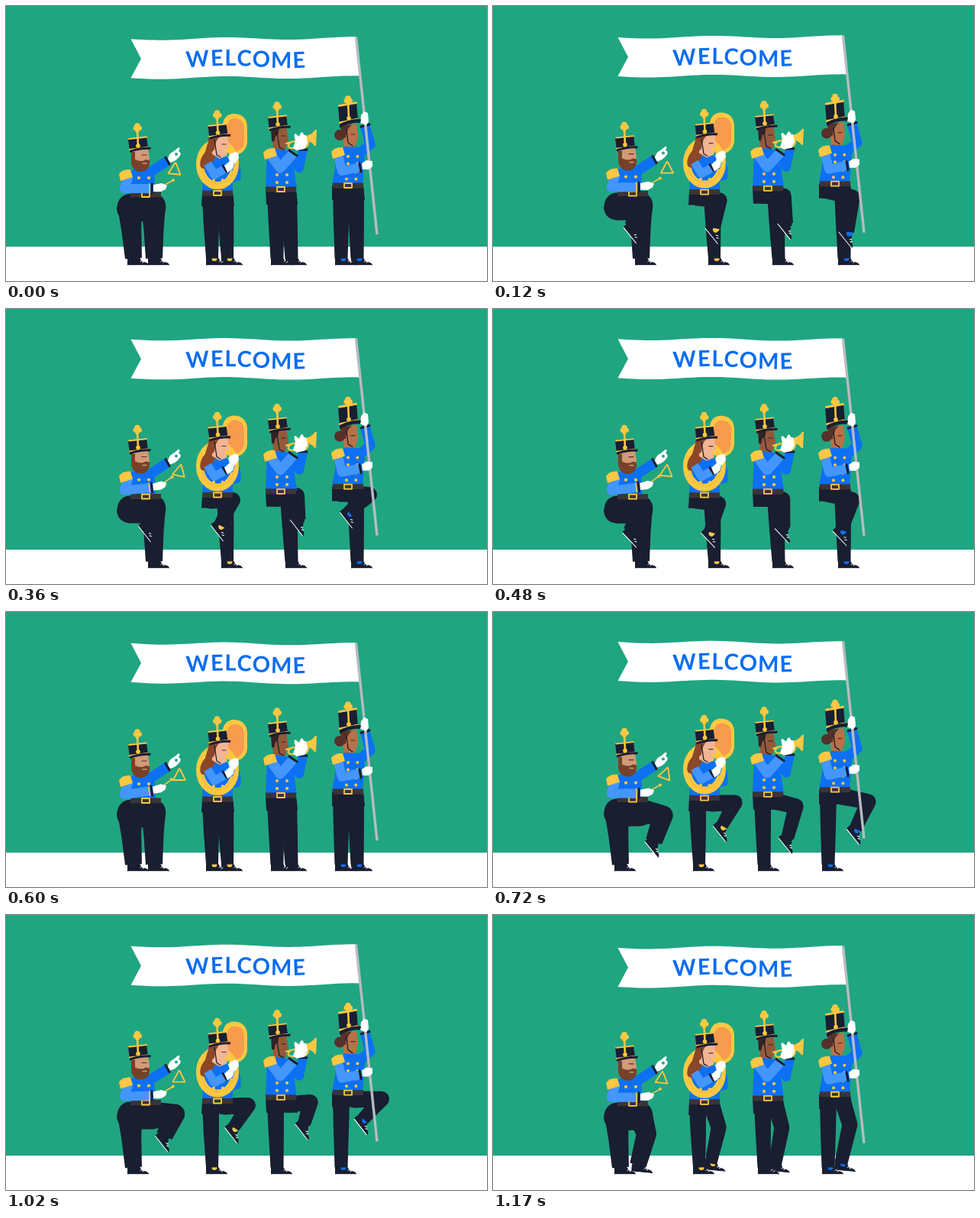
Animation of 630x360 px, one loop 1200 ms. Source, as an HTML page:

```html
<!DOCTYPE html>
<html lang="en">
<head>
<meta charset="utf-8">
<title>Marching band</title>
<style>
html, body { margin: 0; width: 100%; height: 100%; overflow: hidden; background: #fff; }
svg { display: block; }
text { font: 700 29px Lato, "Open Sans", sans-serif; letter-spacing: 1.4px; fill: #0b6df0; }
.n { fill: #191e31; } .b { fill: #0d70f3; } .y { fill: #fdc841; } .w { fill: #fff; }
.ln { fill: none; stroke-linecap: round; stroke-linejoin: round; }
.flat { stroke-linecap: butt; }
.sy { stroke: #fdc841; } .sn { stroke: #191e31; } .sb { stroke: #0d70f3; } .sl { stroke: #4496fb; }
</style>
</head>
<body>
<svg width="630" height="360" viewBox="0 0 630 360">
<defs>
  <g id="crown">
    <path class="n" d="M-13-14 11-17 13-2-11 2Z"/>
    <path class="ln sy" stroke-width="1.800" d="M-12-14 11-16.500M-11 0 12-3"/>
    <path class="n" d="M-11 1Q4-4 17-3L16 0Q5-1-11 4Z"/>
  </g>
  <g id="plume">
    <path class="ln sy" stroke-width="2.600" d="M-1-26 0-5"/>
    <g class="y"><circle cx="-1" cy="-31" r="3.800"/><circle cx="-3.500" cy="-28" r="3"/><circle cx="2" cy="-28" r="3"/><circle cx="-1" cy="-25" r="2.600"/><circle cy="-5" r="2.800"/></g>
  </g>
  <g id="hat"><use href="#crown"/><use href="#plume"/></g>
  <g id="shoe">
    <path class="n" d="M-8-1H8L11 4Q20 5 20 9H-8Z"/>
    <path class="ln" stroke="#fff" d="M-7 9.300H19M9 4 11 2.500M12 5.500 14 4"/>
  </g>
  <g id="belt">
    <path fill="#3b3437" d="M-20-3.500H20V3.500H-20Z"/>
    <rect class="ln sy" x="-5" y="-3" width="10" height="6" stroke-width="1.800"/>
  </g>
  <g id="buttons" class="y">
    <circle r="2.100"/><circle cx="13" r="2.100"/><circle cy="10" r="2.100"/><circle cx="13" cy="10" r="2.100"/>
  </g>
  <path id="pad" class="y" d="M-9-1Q-4-8 6-7L9 3-7 8Z"/>
  <path id="base"/>
</defs>
<rect width="630" height="315" fill="#20a581"/>
<path id="flag" class="w"/>
<text text-anchor="middle"><textPath href="#base" startOffset="50%">WELCOME</textPath></text>

<g id="legs0"></g>
<g id="body0">
  <path class="n" d="M163 247H201Q211 254 209 267 207 281 191 282H162Q146 280 145 265 146 252 163 247Z"/>
  <path class="ln flat sb" stroke-width="13" d="M185 220 211 203"/>
  <path class="ln sn" stroke-width="3" d="M209 198 214 207"/>
  <path class="w" d="M212 200Q214 192 220 190L226 185Q229 186 226 190 231 193 227 197 223 203 215 205Z"/>
  <circle cx="223" cy="194" r="2" fill="#20a581"/>
  <g id="tri"><path class="ln sy" stroke-width="1.800" d="M0 0-8 15H8L1 1"/></g>
  <path class="b" d="M157 218Q163 213 185 213L194 218 196 246H163Z"/>
  <path fill="#d39a78" d="M166 189 186 187 188 200 185 211H167Z"/>
  <path fill="#774029" d="M164 191H169V201Q178 205 183 201L188 202Q189 215 178 217 165 217 164 204Z"/>
  <path class="ln" stroke="#d39a78" stroke-width="1.500" d="M179 206H184"/>
  <path class="ln" stroke="#5a2e20" stroke-width="1.200" d="M178 195H184"/>
  <use href="#buttons" x="174" y="225"/>
  <use href="#belt" x="183" y="247"/>
  <use href="#hat" x="173" y="188"/>
  <path class="ln sl" stroke-width="12" d="M160 225 155 238"/>
  <g id="arm">
    <path class="ln flat sl" stroke-width="12" d="M155 239H190"/>
    <circle cx="155" cy="239" r="6" fill="#4496fb"/>
    <path class="ln sn" stroke-width="3" d="M191 233V245"/>
    <path class="ln sy" stroke-width="1.500" d="M188 233V245"/>
    <path class="ln sy" stroke-width="1.600" d="M203 237 219 228"/><circle class="y" cx="219" cy="228" r="2"/>
    <path class="w" d="M193 234 204 232 211 235 209 240 203 243H193Z"/>
  </g>
  <use href="#pad" x="157" y="221"/>
</g>

<g id="legs1"></g>
<g id="body1">
  <path class="n" d="M257 244H297L299 262H256Z"/>
  <path class="y" d="M283 163Q283 141 299 141 316 142 316 160V178Q315 191 302 195L283 190Z"/>
  <path fill="#f79b4d" d="M289 162Q289 147 300 147 312 148 312 161V178Q311 187 301 191L289 186Z"/>
  <path class="b" d="M259 203 267 197 292 199 304 204Q309 213 307 228L297 231V244H257Z"/>
  <ellipse class="ln sy" cx="277" cy="207" rx="23" ry="28" stroke-width="10"/>
  <path class="ln" stroke="#f2b23a" stroke-width="1" d="M257 195Q252 232 277 233 294 232 298 216"/>
  <path class="b" d="M263 200 289 197 300 205 297 215 268 217Z"/>
  <path fill="#8b4728" d="M267 172Q263 183 261 191 252 202 255 211 262 217 269 207L276 193Z"/>
  <path fill="#f1b596" d="M268 172 290 169 292 184 289 196 280 200 270 194Z"/>
  <path fill="#8b4728" d="M265 173 280 171Q274 176 273 188L266 195Z"/>
  <path class="ln sn" stroke-width="1.300" d="M273 175 276 195 281 198"/>
  <path class="ln" stroke="#5d2d20" stroke-width="1.200" d="M283 181H288"/>
  <use href="#buttons" transform="translate(272 219) scale(.9)"/>
  <use href="#belt" x="277" y="245"/>
  <path class="ln sy" stroke-width="3" d="M288 189 303 192 302 201"/>
  <path class="ln flat sl" stroke-width="11" d="M264 206 273 221 287 213"/>
  <path class="ln sn" stroke-width="3" d="M284 209 289 217"/>
  <path class="w" d="M286 209 293 203 299 206 297 213 290 218Z"/>
  <path class="w" d="M291 197 297 191 304 192 305 199 300 206 293 204Z"/>
  <path class="ln sy" stroke-width="3" d="M288 188 297 191"/>
  <use href="#hat" x="277.500" y="171"/>
</g>

<g id="legs2"></g>
<g id="body2">
  <path class="n" d="M340 240H380L382 260H341Z"/>
  <path fill="#95593a" d="M349 161 367 158 370 175 366 187 360 194H350Z"/>
  <path fill="#332226" d="M347 160 358 159 356 169 353 170 351 178 348 177Z"/>
  <path class="ln sn" stroke-width="1.300" d="M355 166 358 185 364 188"/>
  <path class="ln" stroke="#42261f" stroke-width="1.200" d="M361 170H366"/>
  <path class="b" d="M342 191 353 187 374 190 381 239H340Z"/>
  <path class="ln flat sb" stroke-width="12" d="M371 196 384 212 389 188"/>
  <path class="ln flat sl" stroke-width="13" d="M346 194 359 212 377 192"/>
  <use href="#buttons" x="355" y="221"/>
  <use href="#belt" x="360" y="240"/>
  <use href="#pad" x="346" y="193"/>
  <path class="ln sn" stroke-width="3" d="M371 189 381 196M384 188 394 188"/>
  <path class="y" d="M388 171Q400 170 405 162L407 162 406 183 404 183Q400 176 388 176Z"/>
  <path class="ln sy" stroke-width="2.200" d="M367 180 390 173.500M372 179Q366 186 376 186H388Q398 184 395 176"/>
  <path class="w" d="M376 186 379 176Q376 168 379 167L384 171Q386 164 389 166L390 169Q394 168 394 173L395 179 391 187 381 189Z"/>
  <use href="#hat" x="356" y="160"/>
</g>

<g id="legs3"></g>
<g id="body3">
  <path class="n" d="M427 235H468L470 254H427Z"/>
  <path class="ln flat sb" stroke-width="13" d="M464 192 477 181 470 156"/>
  <path class="ln sn" stroke-width="3" d="M465 158 476 155"/>
  <circle cx="437" cy="169" r="7" fill="#57302a"/>
  <path fill="#b97148" d="M441 157 459 154 461 171 458 182 453 189H443Z"/>
  <path fill="#57302a" d="M438 157 453 155Q445 163 445 172L440 174Z"/>
  <path class="ln sn" stroke-width="1.300" d="M446 162 448 179 454 183"/>
  <path class="ln" stroke="#4b2a22" stroke-width="1.200" d="M452 168H457"/>
  <path class="b" d="M433 188 444 184 467 185 470 195 467 234H427L431 212Z"/>
  <use href="#buttons" transform="translate(448 197) scale(.95)"/>
  <use href="#buttons" transform="translate(446 217) scale(.95)"/>
  <use href="#belt" x="448" y="235"/>
  <path class="ln flat sl" stroke-width="12" d="M435 195 440 216 464 211"/>
  <path class="ln sn" stroke-width="3" d="M463 206 465 217"/>
  <use href="#pad" x="435" y="192"/>
  <path stroke="#b9bbc0" stroke-width="3.400" d="M458.500 41 486 299"/>
  <path class="w" d="M466 206 472 202 480 203 480 210 475 214 467 214Z"/>
  <path class="w" d="M464 153 465 143 469 138 474 140 475 151 472 156Z"/>
  <use href="#crown" transform="translate(448 153) scale(1 1.600)"/>
  <use href="#plume" x="449" y="152"/>
</g>
</svg>
<script>
const LOOP = 1200, HALF = 600, STEP = 30;
const $ = id => document.getElementById(id);
const clamp = v => Math.max(0, Math.min(1, v));
const ease = v => (v = clamp(v)) * v * (3 - 2 * v);
const mix = (a, b, k) => a + (b - a) * k;
const mixP = (p, q, k) => p.map((v, i) => mix(v, q[i], k));

// hip x, hip y, ankle x, then knee and ankle for the raised and the held pose
const people = [
  { w: [32, 26, 22], bob: 1.5, sock: '#191e31', near: [162, 262, 167, 196, 263, 183, 289, 196, 262, 185, 284],
    far: [193, 262, 194, 223, 266, 211, 300, 221, 260, 207, 288] },
  { w: [22, 20, 16], bob: 1.5, sock: '#fdc841', near: [268, 252, 270, 297, 254, 290, 290, 297, 250, 280, 283],
    far: [287, 252, 290, 317, 249, 300, 279, 317, 249, 298, 278] },
  { w: [22, 20, 17], bob: 1.2, sock: '#191e31', near: [353, 249, 355, 381, 248, 385, 284, 381, 244, 384, 276],
    far: [370, 249, 374, 397, 254, 386, 295, 399, 244, 391, 271] },
  { w: [22, 20, 17], bob: 2.4, sock: '#0d70f3', near: [439, 244, 439, 471, 250, 465, 295, 476, 243, 449, 266],
    far: [458, 244, 460, 492, 248, 475, 283, 492, 240, 467, 265] }
];

people.forEach((p, i) => {
  const box = $('legs' + i);
  const leg = `<g><use href="#shoe"/><path class="ln" stroke-width="7" stroke="${p.sock}" d="M3-2V0"/></g><path class="n"/>`;
  box.innerHTML = leg + leg;
  const [farFoot, farLeg, nearFoot, nearLeg] = box.children;
  p.body = $('body' + i);
  p.parts = [[farLeg, farFoot], [nearLeg, nearFoot]];
});

function taper([x, y], [u, v], a, b) {
  const d = Math.hypot(u - x, v - y), nx = (v - y) / d / 2, ny = (x - u) / d / 2;
  return `M${x + nx * a} ${y + ny * a}L${u + nx * b} ${v + ny * b} ${u - nx * b} ${v - ny * b} ${x - nx * a} ${y - ny * a}Z`;
}
const disc = ([x, y], r) => `M${x + r} ${y}A${r} ${r} 0 1 1 ${x - r} ${y}A${r} ${r} 0 1 1 ${x + r} ${y}Z`;

const lift = u => u < 0 || u > HALF ? 0 : ease(u / 130) * ease((HALF - u) / 150);

function drawLeg([path, foot], row, w, u, dy) {
  const k = lift(u), hold = ease((u - 120) / 180) * ease((540 - u) / 150);
  const hip = [row[0], row[1] + dy], ground = [row[2], 330.5];
  const rest = mixP(hip, ground, .46);
  const knee = mixP(rest, mixP(row.slice(3, 5), row.slice(7, 9), hold), Math.pow(k, .6));
  const ankle = mixP(ground, mixP(row.slice(5, 7), row.slice(9, 11), hold), k);
  ankle[0] -= 70 * k * (1 - k) ** 2; // the heel trails while the foot leaves or meets the ground
  path.setAttribute('d', taper(hip, knee, w[0], w[1]) + taper(knee, ankle, w[1], w[2]) +
    disc(hip, w[0] / 2) + disc(knee, w[1] / 2));
  foot.setAttribute('transform', `translate(${ankle}) rotate(${52 * k})`);
}

// time, arm angle, triangle x, triangle tilt
const chime = [[0, 0, 222, 6], [120, -1, 228, 0], [360, -6, 229, 12], [600, -8, 227, 0],
  [720, 0, 229, 20], [900, -3, 230, -3], [1170, 0, 222, 6], [1200, 0, 222, 6]];

function sample(table, t) {
  const i = table.findIndex(r => r[0] > t), a = table[i - 1], b = table[i];
  return mixP(a, b, ease((t - a[0]) / (b[0] - a[0])));
}

function drawFlag(t, dy) {
  const top = x => 42 + dy + 1.7 * Math.sin((x - 163) / 26.5) +
    1.2 * (463 - x) / 300 * Math.cos(t / LOOP * 2 * Math.PI);
  const edge = (from, to, off) => Array.from({ length: 41 }, (_, i) => {
    const x = mix(from, to, i / 40);
    return x + ' ' + (top(x) + off);
  }).join('L');
  $('flag').setAttribute('d', `M${edge(163.5, 458.5, 0)}L${edge(464.5, 163.5, 51)}L177 ${top(177) + 25}Z`);
  $('base').setAttribute('d', 'M' + edge(190, 440, 37));
}

function draw(t) {
  const raise = lift(t % HALF);
  people.forEach(p => {
    const dy = -p.bob * raise;
    p.body.setAttribute('transform', `translate(0 ${dy})`);
    drawLeg(p.parts[0], p.far, p.w, t - HALF, dy);
    drawLeg(p.parts[1], p.near, p.w, t, dy);
  });
  const [, arm, x, tilt] = sample(chime, t);
  $('arm').setAttribute('transform', `rotate(${arm} 155 239)`);
  $('tri').setAttribute('transform', `translate(${x} 205) rotate(${tilt})`);
  drawFlag(t, -2 * raise);
}

const start = performance.now();
function tick() {
  const t = (performance.now() - start) % LOOP;
  draw(Math.floor(t / STEP) * STEP);
  requestAnimationFrame(tick);
}
draw(0);
tick();
</script>
</body>
</html>
```
